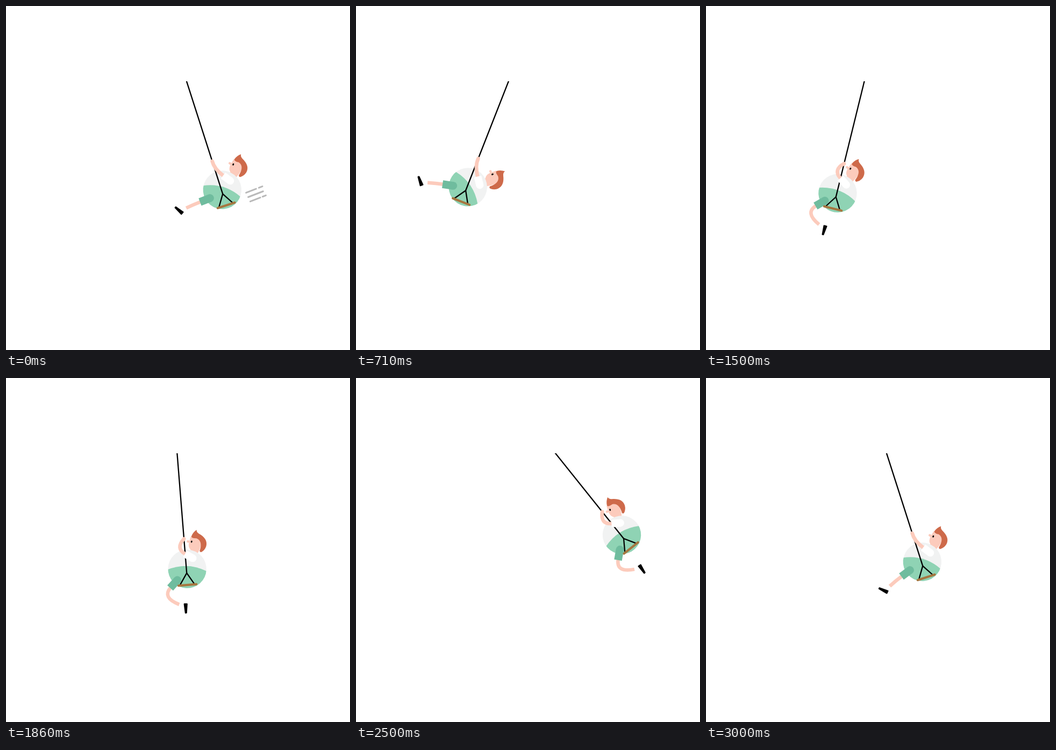
An HTML page with a canvas for the animation above (3.07 s loop, 640 px wide and 640 px high).

```html
<!DOCTYPE html>
<html lang="en">
<head>
<meta charset="utf-8">
<title>Swing</title>
<style>
html, body { margin: 0; width: 100%; height: 100%; overflow: hidden; background: #fff; }
canvas { display: block; width: 640px; height: 640px; }
</style>
</head>
<body>
<canvas id="stage" width="640" height="640"></canvas>
<script>
const ctx = document.getElementById('stage').getContext('2d');
const LOOP = 3070, FPS = 14;
const PIVOT = { x: 312.5, y: 67 }, KNOT = 296.8, SEAT = 319, GRIP = 233;
const BODY = { x: 1.5, y: 289.3, r: 35.7 };
const SHOULDER = { x: 9.5, y: -20.3 }, HIP = { x: -17.4, y: 21.3 };
const SKIN = '#fccbbc', HAIR = '#ce6a4a', SHIRT = '#f1f2f2', SHORTS = '#8fd3b4',
      THIGH = '#6fbc9e', WOOD = '#a6763f', GREY = '#b9b9b9';

// [seconds, degrees]
const SWING = [[0, 17.8], [0.429, -5.5], [0.571, -14], [1.04, -38.3], [1.5, -13.8],
               [1.714, -3], [2.214, 23.5], [2.6, 44], [2.786, 31.8], [3, 17.8]];
const HIP_TURN = [[0, 142.3], [0.43, 134.1], [1.07, 130.6], [1.5, 129.3],
                  [2.21, 130.2], [2.79, 133.4], [3, 126.6]];

const rad = d => d * Math.PI / 180;
const polar = (p, deg, len) => ({
  x: p.x + Math.cos(rad(deg)) * len,
  y: p.y + Math.sin(rad(deg)) * len
});

function track(keys, t) {
  let i = 1;
  while (i < keys.length - 1 && t > keys[i][0]) i++;
  const [t0, a] = keys[i - 1], [t1, b] = keys[i];
  return a + (b - a) * Math.min(1, (t - t0) / (t1 - t0));
}

function smooth(t, from, to) {
  const u = Math.max(0, Math.min(1, (t - from) / (to - from)));
  return u * u * (3 - 2 * u);
}

function stroke(color, width, cap, draw) {
  ctx.strokeStyle = color;
  ctx.lineWidth = width;
  ctx.lineCap = cap;
  ctx.beginPath();
  draw();
  ctx.stroke();
}

function line(color, width, cap, ...pts) {
  stroke(color, width, cap, () => pts.forEach(([x, y], i) => i ? ctx.lineTo(x, y) : ctx.moveTo(x, y)));
}

function bend(color, width, cap, a, c, b) {
  stroke(color, width, cap, () => {
    ctx.moveTo(a.x, a.y);
    ctx.quadraticCurveTo(c.x, c.y, b.x, b.y);
  });
}

function oval(color, x, y, rx, ry = rx) {
  ctx.fillStyle = color;
  ctx.beginPath();
  ctx.ellipse(x, y, rx, ry, 0, 0, Math.PI * 2);
  ctx.fill();
}

function shape(color, d) {
  ctx.fillStyle = color;
  ctx.fill(new Path2D(d));
}

// Cloth tube: round at the joint, cut straight at the other end
function tube(color, p, end, r) {
  oval(color, p.x, p.y, r);
  line(color, r * 2, 'butt', [p.x, p.y], [end.x, end.y]);
}

function inFrame(x, y, deg, draw) {
  ctx.save();
  ctx.translate(x, y);
  ctx.rotate(rad(deg));
  draw();
  ctx.restore();
}

function drawHead() {
  oval(SKIN, -11.8, -49.8, 2.6, 2.3);
  shape(SKIN, 'M-9.5-60L-9.7-48Q-9-39-3.5-36.5L-3-32H11L12.5-40L14-60Z');
  shape(HAIR, 'M-8.5-60.5Q-7.5-69-2.3-74.8Q-1-70.3 4-69C16-66 23-60 23-50Q22.5-42 17-37' +
    'Q14.5-36.5 13.5-38.5C14.5-50 11-59 1.5-59.6Q-7-57-8.5-60.5Z');
  oval('#000', -5.5, -51.2, 1.4, 2);
}

function drawTorso() {
  oval(SHIRT, 0, 0, BODY.r);
  ctx.save();
  ctx.beginPath();
  ctx.arc(0, 0, BODY.r, 0, Math.PI * 2);
  ctx.clip();
  shape(SHORTS, 'M-37 3Q0-14 37 3V40H-37Z');
  ctx.restore();
}

function drawLeg(thigh, knee) {
  const k = (knee / 110) ** 2, shin = thigh - knee;
  const end = polar(HIP, thigh, 20);
  const ctrl = polar(end, thigh, 13 + 11 * k);
  const ankle = polar(ctrl, shin, 15 + 20 * k);
  bend(SKIN, 6.5, 'butt', polar(end, thigh, -2), ctrl, ankle);
  tube(THIGH, HIP, end, 7.3);

  const heel = polar(ankle, shin - 23, 12);
  inFrame(heel.x, heel.y, shin + 67, () => {
    const sole = new Path2D('M-.5-2.4L16-.8V.8L-.5 2.4Z');
    ctx.fillStyle = ctx.strokeStyle = '#000';
    ctx.lineWidth = 2.4;
    ctx.lineJoin = 'round';
    ctx.fill(sole);
    ctx.stroke(sole);
  });
}

function drawArm(lean) {
  const up = 200 + (34.3 - lean) * 0.28;
  const cuff = polar(SHOULDER, up, 16.5);
  const elbow = polar(SHOULDER, up, 37.5);
  const c = Math.cos(rad(lean)), s = Math.sin(rad(lean));
  const dx = -BODY.x, dy = GRIP - BODY.y;
  const hand = { x: dx * c + dy * s, y: dy * c - dx * s };
  bend(SKIN, 6.8, 'round', hand, elbow, cuff);
  tube('#fff', SHOULDER, cuff, 7);
}

function drawRope() {
  line('#000', 2.3, 'butt', [0, 0], [0, KNOT]);
  line('#000', 2.3, 'butt', [-14.8, SEAT], [0, KNOT], [13, SEAT]);
  line(WOOD, 4.2, 'round', [-17, SEAT], [16.3, SEAT]);
}

// Short whoosh left hanging in the air at the start of the loop
function drawWhoosh(t) {
  const k = t * 7;
  if (k >= 1) return;
  inFrame(PIVOT.x, PIVOT.y, -SWING[0][1], () => {
    const shift = 34 * k, tail = 43 + 68 * k;
    [[42, 62, 67.5, 74.5, 308], [43.3, 73, 0, 0, 317], [44.5, 64.5, 69, 75.5, 326]]
      .forEach(([a, b, c, d, y]) => [[a, b], [c, d]].forEach(([from, to]) => {
        const x0 = Math.max(from + shift, k ? tail : 0), x1 = to + shift;
        const at = x => [x, y - (x - shift - 42) * 0.06];
        if (to && x1 > x0) line(GREY, 3, 'round', at(x0), at(x1));
      }));
  });
}

function draw(t) {
  const swing = track(SWING, t);
  const back = smooth(t, 2.6, 3);
  const lean = 34.4 - 27.5 * (smooth(t, 0.95, 1.5) - back);
  const knee = 5 + 106 * (smooth(t, 1, 1.5) - back);
  const onBody = fn => inFrame(BODY.x, BODY.y, lean, fn);

  ctx.fillStyle = '#fff';
  ctx.fillRect(0, 0, 640, 640);
  ctx.save();
  ctx.beginPath();
  ctx.rect(0, 140, 640, 500);
  ctx.clip();
  drawWhoosh(t);
  inFrame(PIVOT.x, PIVOT.y, -swing, () => {
    onBody(() => {
      inFrame(0, 0, 12.9, drawHead);
      drawTorso();
      drawLeg(track(HIP_TURN, t), knee);
    });
    drawRope();
    onBody(() => drawArm(lean));
  });
  ctx.restore();
}

// Steps fall on hundredths of a second
const stepStart = n => Math.round(n * 100 / FPS) * 10;
const start = performance.now();

function tick() {
  const ms = (performance.now() - start) % LOOP;
  let n = Math.floor(ms * FPS / 1000) + 1;
  while (n > 0 && stepStart(n) > ms) n--;
  draw(Math.min(n, 42) / FPS);
  requestAnimationFrame(tick);
}
tick();
</script>
</body>
</html>
```
